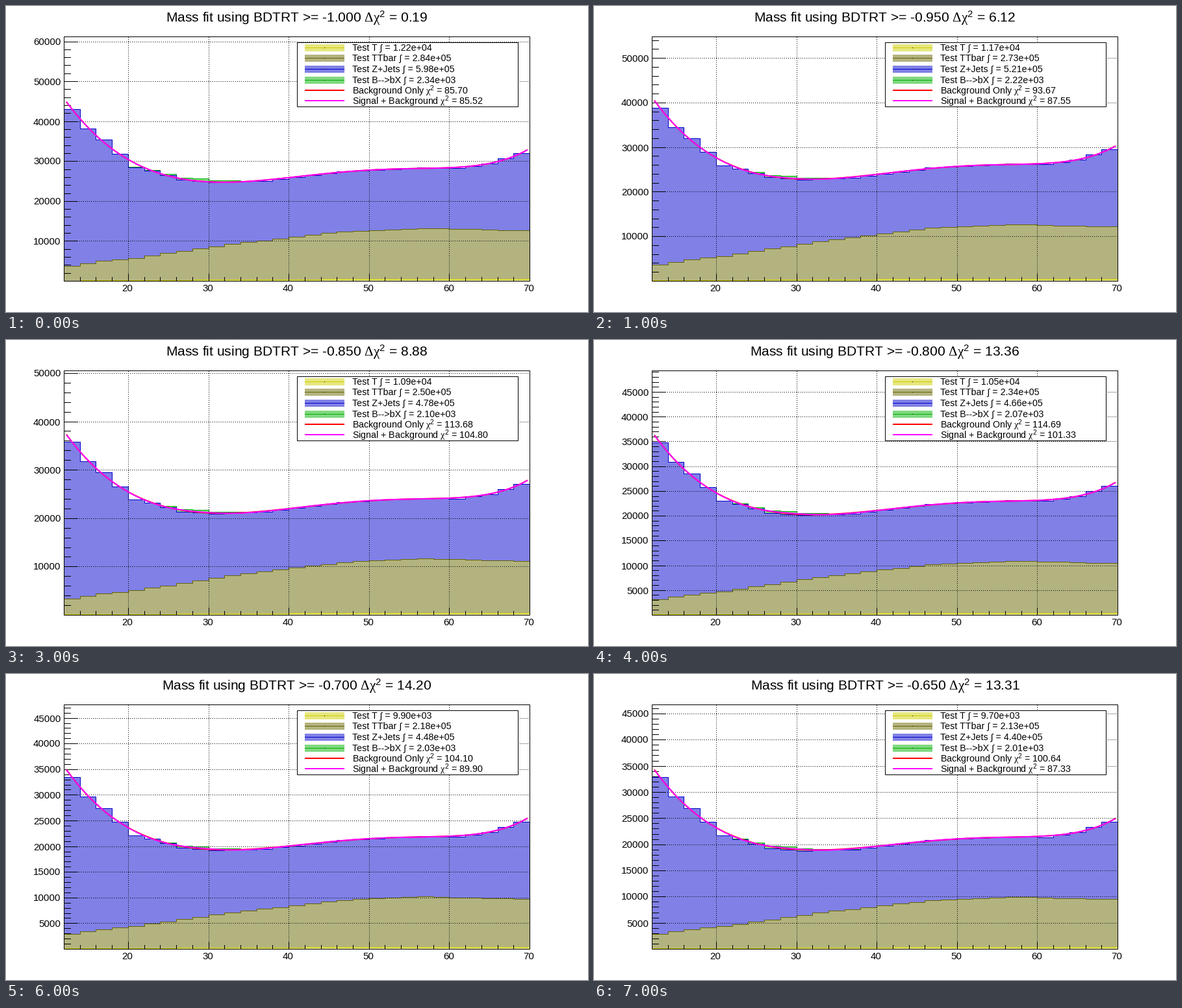
Recreate the animation shown at these times as a matplotlib script. Size 896x472 px, loop 8 s.

```python
import numpy as np
import matplotlib.pyplot as plt
from matplotlib.animation import FuncAnimation
from matplotlib.patches import Rectangle

W, H, DPI = 896, 472, 100
PX = 72 / DPI
LEFT, RIGHT, TOP, BOTTOM = 89, 806, 47, 424
HEIGHT = BOTTOM - TOP
BINS = np.arange(29)
STEPS = 8

plt.rcParams.update({
    "font.family": "Liberation Sans",
    "mathtext.fontset": "custom",
    "mathtext.rm": "Liberation Serif",
    "mathtext.default": "regular",
})

COLORS = {"T": "#cccc00", "TTbar": "#666600", "Z+Jets": "#0000cc", "B-->bX": "#00b000"}
RED, MAGENTA = "#ff0000", "#ff00ff"
CHI2 = r"$\mathrm{\chi}^2$"

# Values that the plot prints, one per cut step
AREA = {
    "T": [12200, 11700, 11300, 10900, 10500, 10100, 9900, 9700],
    "TTbar": [284e3, 273e3, 262e3, 250e3, 234e3, 223e3, 218e3, 213e3],
    "Z+Jets": [598e3, 521e3, 498e3, 478e3, 466e3, 457e3, 448e3, 440e3],
    "B-->bX": [2340, 2220, 2160, 2100, 2070, 2050, 2030, 2010],
}
CHI_BG = [85.704, 93.67, 104.20, 113.68, 114.69, 107.646, 104.10, 100.64]
DELTA = [0.186, 6.12, 7.40, 8.88, 13.36, 15.254, 14.20, 13.31]
Y_MAX = [61220, 54800, 52600, 50520, 49320, 48460, 47600, 46730]

# Share of events per bin for the two lower layers
TOP_SHARE = np.interp(BINS, [0, 2, 4, 10, 17, 22, 28],
                      [.0130, .0171, .0197, .0314, .0421, .0449, .0429])
# The axis range follows the Z peak, so this layer keeps its height in pixels
Z_HEIGHT = np.interp(BINS, [0, 1, 2, 3, 4, 5, 7, 9, 12, 24, 26, 28],
                     [242, 208, 187, 163, 140, 131, 110, 99, 92, 93.5, 102, 119])

fig = plt.figure(figsize=(W / DPI, H / DPI), dpi=DPI, facecolor="white")
ax = fig.add_axes([0, 0, 1, 1])


def tint(color):
    return tuple((c + 1) / 2 for c in plt.matplotlib.colors.to_rgb(color))


def px(value):
    return LEFT + (value - 12) * (RIGHT - LEFT) / 58


EDGES = np.round(px(12 + 2 * np.arange(len(BINS) + 1)))
CENTERS = px(13 + 2 * BINS)


def line(x, y, color="black", width=1, **kw):
    ax.plot(x, y, color=color, lw=width * PX, snap=False,
            solid_capstyle="butt", dash_capstyle="butt", **kw)


def dotted(x, y):
    line(x, y, ls=(0, (1, 2)))


def box(x, y, w, h, **kw):
    ax.add_patch(Rectangle((x, y), w, h, snap=False, **kw))


def label(x, y, text, size, ha="left"):
    drop = 1.5 if "$" in text else 0
    ax.text(x, y + drop, text, fontsize=size * PX, ha=ha, va="baseline")


def signal_bump(x, step):
    """Height in pixels of the signal, a narrow peak at 29."""
    width = 3
    value = 12 + (x - LEFT) * 58 / (RIGHT - LEFT)
    peak = AREA["B-->bX"][step] * 2 / (width * np.sqrt(2 * np.pi))
    return peak * np.exp(-((value - 29) / width) ** 2 / 2) * HEIGHT / Y_MAX[step]


def layers(step):
    """Stacked heights in pixels, lowest layer first."""
    unit = TOP_SHARE * HEIGHT / Y_MAX[step]
    t = AREA["T"][step] * unit
    lower = t + AREA["TTbar"][step] * unit
    total = lower + Z_HEIGHT
    return [t, lower, total, total + signal_bump(CENTERS, step)]


def draw_stack(stack):
    for heights, color in reversed(list(zip(stack, COLORS.values()))):
        tops = np.round(BOTTOM + 0.5 - heights)
        ax.stairs(tops, EDGES, baseline=BOTTOM, fill=True, fc=tint(color),
                  lw=0, snap=False)
        ax.stairs(tops + 0.5, EDGES + 0.5, baseline=None, ec=color,
                  lw=PX, snap=False)


def draw_axes(y_max):
    for v in range(12, 71, 2):
        x = round(px(v)) + 0.5
        major = v % 10 == 0
        line([x, x], [BOTTOM, BOTTOM - (11 if major else 6)])
        if major:
            label(px(v) - 1, 440, str(v), 15, "center")
            if v < 70:
                dotted([x, x], [BOTTOM, TOP])

    step = 10000 if y_max > 50000 else 5000
    for k in range(1, int(y_max / step * 5) + 1):
        y = round(BOTTOM - k * step / 5 * HEIGHT / y_max) + 0.5
        major = k % 5 == 0
        line([LEFT, LEFT + (22 if major else 11)], [y, y])
        if major:
            label(84.5, y + 5, str(k // 5 * step), 15, "right")
            dotted([LEFT, RIGHT], [y, y])
    box(LEFT + .5, TOP + .5, RIGHT - LEFT, HEIGHT, fill=False, lw=PX, zorder=3)


def draw_fits(total, step):
    def scale(x):
        return (x - 448) / 355

    x = np.linspace(93, 803, 100)
    strength = 0.6 * np.sqrt(DELTA[step] / 15)
    smeared = total + strength * signal_bump(CENTERS, step)
    plain = np.polyfit(scale(CENTERS), total, 6)
    absorbed = np.polyfit(scale(CENTERS), smeared, 6)
    background = np.polyval(absorbed, scale(x))
    signal = np.polyval(plain, scale(x)) + strength * signal_bump(x, step)
    line(x, BOTTOM + .5 - background, RED, 2, zorder=4)
    line(x, BOTTOM + .5 - signal, MAGENTA, 2, zorder=4)


def draw_legend(step):
    box(448.5, 56.5, 340, 99, fc="white", ec="black", lw=PX, zorder=2.5)
    bg, sig = CHI_BG[step], CHI_BG[step] - DELTA[step]
    texts = [f"Test {name} ∫ = {vals[step]:.2e}" for name, vals in AREA.items()]
    texts += [f"Background Only {CHI2} = {bg:.2f}",
              f"Signal + Background {CHI2} = {sig:.2f}"]
    colors = [*COLORS.values(), RED, MAGENTA]
    for k, (text, color) in enumerate(zip(texts, colors)):
        y = round(64 + 16.5 * k)
        label(533, y + 4.5, text, 14.2)
        if k < len(COLORS):
            box(460, y - 5, 61, 11, fc=tint(color), lw=0, zorder=3)
            line([460, 521], [y + .5, y + .5], color, zorder=4)
            line([490, 491], [y + .5, y + .5], zorder=5)
        else:
            line([460, 521], [y, y], color, 2, zorder=4)


def draw(step):
    ax.clear()
    ax.axis("off")
    stack = layers(step)
    draw_stack(stack)
    draw_axes(Y_MAX[step])
    draw_fits(stack[2], step)
    draw_legend(step)
    cut = -1 + 0.05 * step
    label(448, 23, f"Mass fit using BDTRT >= {cut:.3f} "
          rf"$\mathrm{{\Delta\chi}}^2$ = {DELTA[step]:.2f}", 21, "center")
    ax.set_xlim(0, W)
    ax.set_ylim(H, 0)


anim = FuncAnimation(fig, draw, frames=STEPS, init_func=lambda: draw(0),
                     interval=1000, repeat=True, repeat_delay=0)
plt.show()
```
